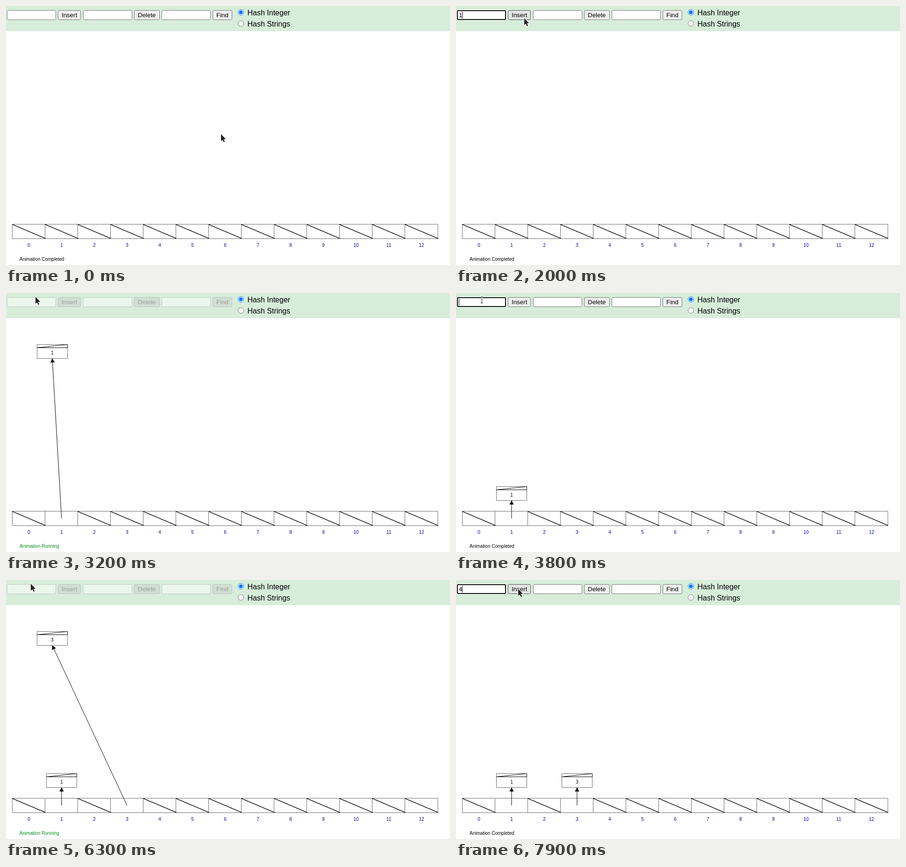
Recreate the animation shown at these times as an HTML page with a canvas. Size 950 px wide and 556 px high, loop 8 s.

```html
<!DOCTYPE html>
<html lang="en">
<head>
<meta charset="utf-8">
<title>Open hashing</title>
<style>
html, body { margin: 0; width: 100%; height: 100%; overflow: hidden; background: #fff; }
canvas { display: block; }
</style>
</head>
<body>
<canvas id="stage" width="950" height="556"></canvas>
<script>
const ctx = document.getElementById('stage').getContext('2d');
const LOOP = 8000, TICK = 100;
const FONT = '"Liberation Sans", Arial, sans-serif';
const INK = '#000', EDGE = '#6c6c6c', BLUE = '#0000aa';

// Each run starts with the click; "at" is when its hash labels settle.
const runs = [{ key: 1, at: 2500 }, { key: 3, at: 5600 }];

// time, shape, x, y
const pointer = [
  [0, 'arrow', 460, 275], [500, 'arrow', 318, 158], [600, 'arrow', 148, 20], [700, 'none', 0, 0],
  [900, 'beam', 48, 7], [1000, 'beam', 51, 10], [1200, 'beam', 54, 13],
  [1500, 'beam', 62, 16], [1600, 'beam', 77, 22],
  [1800, 'arrow', 112, 24], [1900, 'arrow', 132, 25], [2000, 'arrow', 146, 26],
  [2100, 'arrow', 146, 25], [2200, 'arrow', 145, 24], [2300, 'arrow', 144, 23],
  [2800, 'arrow', 138, 20], [2900, 'arrow', 118, 16], [3000, 'arrow', 92, 11],
  [3100, 'arrow', 72, 9], [3200, 'arrow', 63, 8], [3400, 'arrow', 59, 9],
  [3600, 'beam', 57, 11], [3700, 'beam', 56, 13], [3800, 'beam', 55, 15],
  [4900, 'beam', 62, 14], [5000, 'beam', 86, 13], [5100, 'arrow', 125, 18], [5200, 'arrow', 141, 20],
  [5400, 'arrow', 140, 19], [5900, 'arrow', 128, 17], [6000, 'arrow', 104, 13],
  [6100, 'arrow', 78, 10], [6200, 'arrow', 60, 8], [6300, 'arrow', 53, 8],
  [6700, 'beam', 50, 13], [7000, 'beam', 51, 11], [7100, 'beam', 52, 12],
  [7500, 'beam', 80, 13], [7600, 'arrow', 118, 20], [7700, 'arrow', 133, 19]
];

// time, focused, text, caret
const typing = [
  [0, false, '', false], [1200, true, '', true], [1500, true, '1', true],
  [2300, false, '1', false], [2400, false, '', false],
  [3700, true, '', true], [4500, true, '', false], [4900, true, '3', true],
  [5400, false, '3', false], [5500, false, '', false],
  [7100, true, '', true], [7500, true, '', false], [7900, true, '4', true]
];

const current = (list, t) => list.filter(k => k[0] <= t).pop();
const clamp = v => Math.min(1, Math.max(0, v));
const mix = (a, b, p) => a + (b - a) * p;
const slotX = i => 119 + 70 * (i - 1);

function text(s, x, y, size = 10, color = INK, align = 'left') {
  ctx.font = size + 'px ' + FONT;
  ctx.textAlign = align;
  ctx.fillStyle = color;
  ctx.fillText(s, x, y);
}

function line(x1, y1, x2, y2, color = INK, width = 1) {
  ctx.strokeStyle = color;
  ctx.lineWidth = width;
  ctx.beginPath();
  ctx.moveTo(x1, y1);
  ctx.lineTo(x2, y2);
  ctx.stroke();
}

function box(x, y, w, h, r, fill, stroke, width = 1) {
  ctx.beginPath();
  ctx.roundRect(x, y, w, h, r);
  if (fill) { ctx.fillStyle = fill; ctx.fill(); }
  if (stroke) { ctx.strokeStyle = stroke; ctx.lineWidth = width; ctx.stroke(); }
}

function disc(x, y, r, fill, stroke, width = 1) {
  ctx.beginPath();
  ctx.arc(x, y, r, 0, Math.PI * 2);
  if (fill) { ctx.fillStyle = fill; ctx.fill(); }
  if (stroke) { ctx.strokeStyle = stroke; ctx.lineWidth = width; ctx.stroke(); }
}

function shape(points) {
  ctx.beginPath();
  points.forEach(([x, y]) => ctx.lineTo(x, y));
  ctx.closePath();
}

function field(x, off, hover) {
  box(x + .5, 9.5, 104, 20, 2, off ? 'rgba(255,255,255,.5)' : '#fff',
    off ? 'rgba(118,118,118,.3)' : hover ? '#4f4f4f' : '#767676');
}

function button(x, w, label, off, state) {
  const fill = { idle: '#efefef', hover: '#e5e5e5', press: '#f5f5f5' }[state];
  const edge = { idle: '#767676', hover: '#4f4f4f', press: '#8d8d8d' }[state];
  box(x + .5, 9.5, w - 1, 20, 2.5, off ? 'rgba(205,215,207,.6)' : fill, off ? 'rgba(118,118,118,.3)' : edge);
  text(label, x + 8, 24, 13.333, off ? 'rgba(16,16,16,.3)' : INK);
}

function radio(y, label, on) {
  disc(502.5, y, 6, '#fff', on ? '#0075ff' : '#767676');
  if (on) disc(502.5, y, 4, '#0075ff');
  text(label, 516.5, y + 6.5, 16);
}

function toolbar(t, busy) {
  const [, kind, mx, my] = current(pointer, t);
  const [, focus, value, caret] = current(typing, t);
  const overField = kind === 'beam';
  const overInsert = kind === 'arrow' && mx >= 111 && mx < 160 && my >= 9 && my < 30;
  const press = t === 2300 || t === 5400;

  ctx.fillStyle = '#d7edda';
  ctx.fillRect(0, 0, 950, 54);
  [2, 165, 333].forEach((x, i) => field(x, busy, i === 0 && overField));
  if (focus) {
    box(1.5, 8.5, 106, 22, 3.5, null, '#fff');
    box(3, 10, 103, 19, 2, null, '#101010', 2);
  }
  text(value, 6, 24, 13.333);
  if (caret) {
    ctx.fillStyle = INK;
    ctx.fillRect(value ? 13 : 6, 12, 1, 15);
  }
  button(111, 49, 'Insert', busy, press ? 'press' : overInsert ? 'hover' : 'idle');
  button(274, 55, 'Delete', busy, 'idle');
  button(442, 42, 'Find', busy, 'idle');
  radio(13.5, 'Hash Integer', true);
  radio(37.5, 'Hash Strings', false);
}

function table(used) {
  for (let i = 0; i < 13; i++) {
    const x = 13.5 + 70 * i;
    box(x, 468.5, 70 + (i === 12 ? .5 : 0), 31, 0, '#fff', EDGE);
    text(i, slotX(i), 517, 10, BLUE, 'center');
  }
  for (let i = 0; i < 13; i++) {
    const x = 13.5 + 70 * i;
    if (!used.includes(i)) line(x, 468.8, x + 71, 499.2, INK, 1.3);
  }
}

function arrow(x1, y1, x2, y2) {
  const a = Math.atan2(y2 - y1, x2 - x1);
  line(x1, y1, x2, y2);
  ctx.save();
  ctx.translate(x2, y2);
  ctx.rotate(a);
  shape([[0, 0], [-8.5, -4.6], [-8.5, 4.6]]);
  ctx.fillStyle = INK;
  ctx.fill();
  ctx.restore();
}

function node(key, p) {
  const x = mix(99, slotX(key), p), y = mix(125, 430, p);
  const left = x - 32.5, right = x + 32.5, top = y - 14.5, split = y - 7.5;
  box(left, top, 65, 30, 0, '#fff', EDGE);
  line(left, split, right, split);
  line(left, split, right, top);
  line(right, top, right, split);
  text(key, x, y + 7, 10, INK, 'center');
  arrow(slotX(key) - .1, 484, x, y + 15.5);
}

function drawRun({ key, at }, t) {
  const s = t - at;
  if (s >= -100 && s < 700) {
    text('Inserting element: ' + key, 9, 87);
    text(key + ' % 13 =', 278, 87);
    text(key, 349, 87, 10, INK, 'center');
  }
  if (s >= 300 && s < 700) {
    const p = clamp((s - 250) / 400);
    disc(mix(349, slotX(key), p), mix(83, 513, p), 18, null, BLUE, 4);
  }
  if (s >= 700) node(key, clamp((s - 700) / 400));
}

function cursor(t) {
  const [, kind, x, y] = current(pointer, t);
  if (kind === 'none') return;
  ctx.save();
  ctx.translate(x, y);
  if (kind === 'arrow') {
    shape([[0, 0], [0, 15], [3.4, 12], [5.8, 17.3], [8.2, 16.2], [5.9, 11.1], [10.2, 10.8]]);
    ctx.lineJoin = 'round';
    ctx.strokeStyle = '#fff';
    ctx.lineWidth = 2;
    ctx.stroke();
    ctx.fillStyle = '#222';
    ctx.fill();
  } else {
    for (const [color, w] of [['rgba(255,255,255,.9)', 3], ['#222', 1]]) {
      line(.5, -6, .5, 6, color, w);
      line(-2, -6.5, 3, -6.5, color, w);
      line(-2, 6.5, 3, 6.5, color, w);
    }
  }
  ctx.restore();
}

function draw(now) {
  const t = Math.floor((now % LOOP) / TICK) * TICK;
  const busy = runs.some(r => t >= r.at - 100 && t < r.at + 1100);
  const used = runs.filter(r => t >= r.at + 700).map(r => r.key);
  ctx.fillStyle = '#fff';
  ctx.fillRect(0, 0, 950, 556);
  toolbar(t, busy);
  table(used);
  runs.forEach(r => drawRun(r, t));
  text(busy ? 'Animation Running' : 'Animation Completed', 29, 547, 10, busy ? '#008c1e' : INK);
  cursor(t);
}

const start = performance.now();
function tick() {
  draw(performance.now() - start);
  requestAnimationFrame(tick);
}
tick();
</script>
</body>
</html>
```
